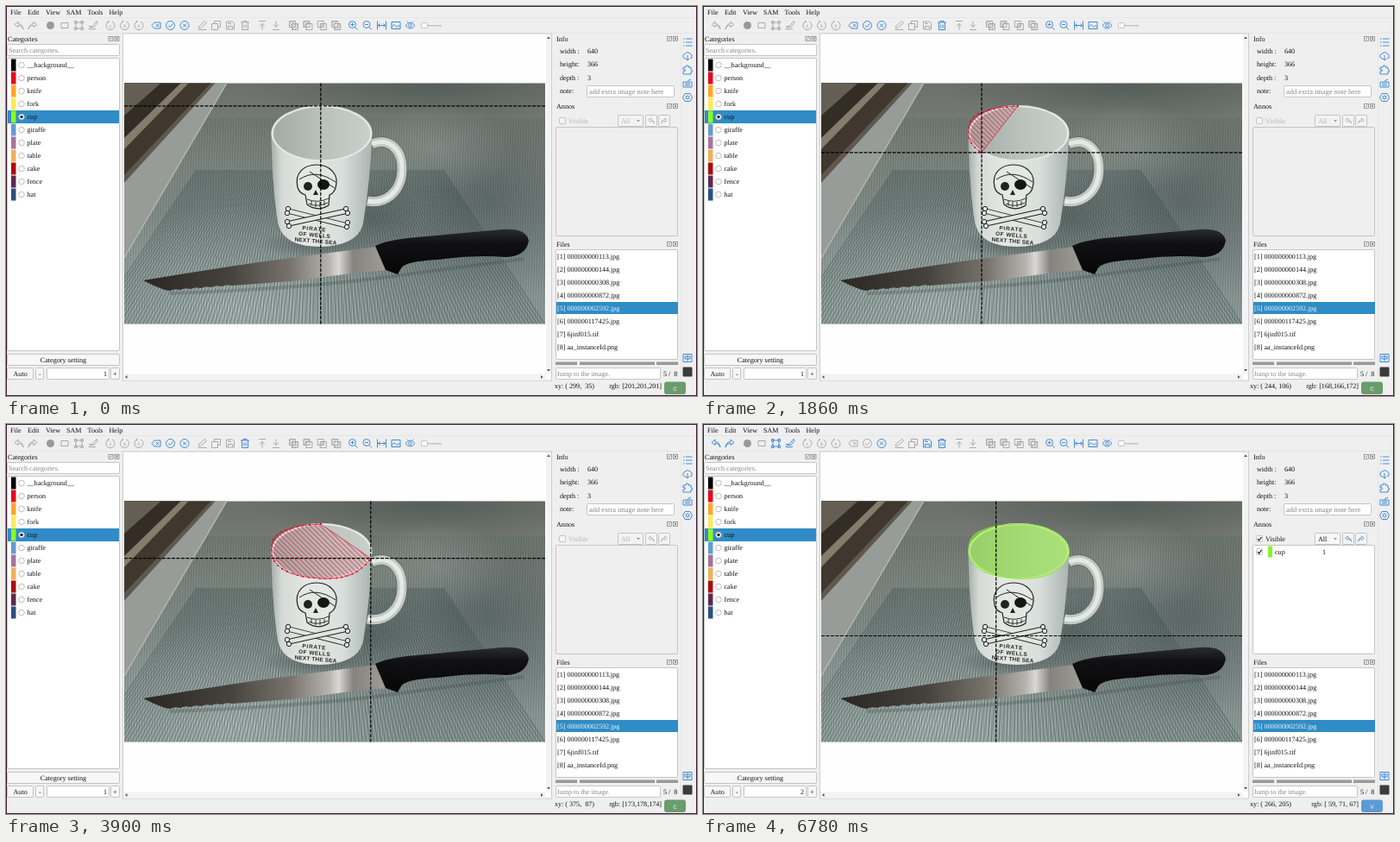
These frames come from a looping animation (801x452 px, 6.84 s). An HTML page:

```html
<!DOCTYPE html>
<html lang="en">
<head>
<meta charset="utf-8">
<title>Annotating a cup</title>
<style>
html, body { margin: 0; width: 100%; height: 100%; overflow: hidden; background: #efefef; }
svg { display: block; width: 100vw; height: 100vh; }
text { font: 8.1px "Liberation Serif", "Times New Roman", serif; white-space: pre; text-rendering: geometricPrecision; }
.sans { font: bold 6.4px "Liberation Sans", Arial, sans-serif; }
.icon { fill: none; stroke: #a2a2a2; stroke-width: .9; }
.icon.on { stroke: #2f7fd3; }
.icon text { font: 5px "Liberation Sans", Arial, sans-serif; stroke: none; fill: #999; text-anchor: middle; }
</style>
</head>
<body>
<svg id="stage" viewBox="0 0 801 452"></svg>
<script>
const LOOP = 6840, DONE = 6420, BLUE = '#308cc6', SCALE = 0.762;
const stage = document.getElementById('stage');

// Markup helpers
const text = (x, y, s, fill = '#111', more = '') => `<text x="${x}" y="${y}" fill="${fill}" ${more}>${s}</text>`;
const path = (d, fill, more = '') => `<path d="${d}" fill="${fill}" ${more}/>`;
const stroke = (d, color, width, more = '') => path(d, 'none', `stroke="${color}" stroke-width="${width}" ${more}`);
const rect = (x, y, w, h, fill, more = '') =>
  `<rect x="${x}" y="${y}" width="${w}" height="${h}" fill="${fill}" ${more}/>`;
const box = (x, y, w, h, fill = '#fff') =>
  rect(x + .5, y + .5, w - 1, h - 1, fill, 'stroke="#b9b9b9" stroke-width=".8" rx="1"');
const gradient = (id, stops, more = '') => `<linearGradient id="${id}" ${more}>` +
  stops.map(([at, c]) => `<stop offset="${at}" stop-color="${c}"/>`).join('') + '</linearGradient>';
const lines = (id, gap, angle, color, width) =>
  `<pattern id="${id}" width="${gap}" height="${gap}" patternUnits="userSpaceOnUse" patternTransform="rotate(${angle})">
  <path d="M${gap / 2} 0V${gap}" stroke="${color}" stroke-width="${width}"/></pattern>`;
// states: one digit per phase (idle, drawing, done), 1 = enabled
const icon = (x, y, states, d, more = '', scale = 1) =>
  `<g class="icon" data-states="${states}" transform="translate(${x} ${y}) scale(${scale})"><path d="${d}"/>${more}</g>`;

const defs = `<defs>
${gradient('mat', [[0, '#6c706a'], [.35, '#7f8681'], [1, '#8f9c9a']], 'x2="0" y2="1"')}
${gradient('body', [[0, '#a5aeaa'], [.1, '#d3d9d6'], [.35, '#e4e8e5'], [.7, '#d9dfdc'], [1, '#a9b3af']])}
${gradient('inside', [[0, '#a4aba7'], [.5, '#bac1bd'], [1, '#c9cfcb']])}
${gradient('blade', [[0, '#2a2723'], [.35, '#45423d'], [.6, '#77736c'], [.76, '#b5b3ae'], [.8, '#d8d8d4'], [.86, '#85837e'], [1, '#a09e98']])}
${gradient('grip', [[0, '#2a2c2f'], [.3, '#111113'], [1, '#060606']], 'x2="0" y2="1"')}
<radialGradient id="shade"><stop stop-color="#3f4b4b" stop-opacity=".5"/><stop offset="1" stop-color="#3f4b4b" stop-opacity="0"/></radialGradient>
<radialGradient id="glow"><stop stop-color="#c8d2cf" stop-opacity=".6"/><stop offset="1" stop-color="#c8d2cf" stop-opacity="0"/></radialGradient>
${lines('weave', 3, 2, '#28403f', 1)}${lines('hatch', 4, -45, '#d8142c', .8)}
<marker id="dot" markerWidth="2" markerHeight="2" refX="1" refY="1" markerUnits="userSpaceOnUse"><rect width="2" height="2" fill="#e01028"/></marker>
<clipPath id="frame"><rect x="137" y="89.5" width="488" height="279"/></clipPath></defs>`;

const bone = d => stroke(d, '#222', 6.4, 'stroke-linecap="round"') + stroke(d, '#e2e6e3', 4.4, 'stroke-linecap="round"');
const knob = (x, y) => `<circle cx="${x}" cy="${y}" r="2.7" fill="#e2e6e3" stroke="#222"/>`;
const handle = 'M424 160C443 152 460 165 459 191C458 215 440 230 419 226';
// Fine threads fanning out towards the viewer
const fan = Array.from({ length: 120 }, (_, i) => `M${365 + (i - 60) * 2.4} 190L${365 + (i - 60) * 4.4} 369`).join('');

const photo = `<g clip-path="url(#frame)">
${rect(137, 89, 488, 280, 'url(#mat)')}
<ellipse cx="270" cy="350" rx="200" ry="120" fill="url(#glow)"/>
<ellipse cx="560" cy="225" rx="140" ry="120" fill="url(#shade)"/>
<ellipse cx="490" cy="95" rx="210" ry="40" fill="url(#shade)"/>
<ellipse cx="500" cy="165" rx="90" ry="50" fill="url(#glow)" opacity=".4"/>
${rect(137, 130, 488, 239, 'url(#weave)', 'opacity=".25"')}
${stroke(fan, '#24383a', 1.5, 'opacity=".3"')}
${path('M137 89H256L137 292Z', '#979c98')}
${stroke('M256 89L137 292', '#b0b6b1', 1.5)}
${path('M137 89H243L137 205Z', '#5e594f')}
${path('M137 89H238L137 196Z', '#40382e')}
${path('M137 89H212L137 166Z', '#857c6c')}
${path('M137 89H203L137 153Z', '#332d26')}
${path('M137 89H180L137 127Z', '#645e53')}
<ellipse cx="425" cy="245" rx="60" ry="45" fill="url(#shade)"/>
<ellipse cx="360" cy="276" rx="66" ry="16" fill="url(#shade)"/>
${stroke(handle, '#59635f', 12.5) + stroke(handle, '#c0c9c5', 11) + stroke(handle, '#e4e9e6', 5)}
${path('M307.500 146C308 190 311 225 315 250Q320 279 364 279Q408 278 414 252Q422 205 424.500 146Z', 'url(#body)')}
<ellipse cx="366" cy="147.500" rx="58.500" ry="32.500" fill="#e4e8e5"/>
<ellipse cx="366" cy="147.700" rx="56" ry="30.500" fill="url(#inside)"/>
${bone('M329 238L393 254')}${bone('M329 252L393 238')}
${knob(327, 235) + knob(326, 240) + knob(395, 256) + knob(396, 251) + knob(326, 250) + knob(328, 255) + knob(394, 235) + knob(396, 240)}
${path('M338 210C334 193 346 184 360 184S387 194 382 211Q380 217 375 219L374 231Q361 239 349 230L347 219Q340 217 338 210Z', '#e4e8e5', 'stroke="#222" stroke-width="1.200"')}
${stroke('M340 201Q359 188 382 204M352 192L381 211', '#222', 1)}
<circle cx="350" cy="209" r="5" fill="#222"/><ellipse cx="368" cy="207" rx="7" ry="6" fill="#151515"/>
${path('M359 213L356 219L362 219Z', '#222')}
${stroke('M349 224Q361 229 374 223M351 229Q361 234 373 228M354 226V231M359 227V233M364 227V233M369 226V231', '#222', .9)}
<g fill="#252525" text-anchor="middle" transform="rotate(5 358 262)">
<text class="sans" x="357" y="260.500" letter-spacing=".8">PIRATE</text>
<text class="sans" x="358" y="267.500" letter-spacing=".5">OF WELLS</text>
<text class="sans" x="360" y="274.500" letter-spacing=".2">NEXT THE SEA</text></g>
${stroke('M190 333Q340 328 450 313L600 293', '#354341', 4, 'opacity=".25"')}
${path('M159 318Q230 306 300 296L429 279L442 306L400 310L330 319L262 324' + 'l-6-.800l-6 1.800'.repeat(6) + 'L184 329Q170 324 159 318Z', 'url(#blade)')}
${path('M428 278Q440 272 465 269L575 259Q603 257 606 272Q603 290 580 291Q540 288 500 294Q462 296 458 304L454 311L440 306Z', 'url(#grip)')}
</g>`;

const ring = 'M-5 0a5 5 0 1 0 10 0a5 5 0 1 0-10 0';
const cycle = 'M-2-4.500A5 5 0 1 0 2-4.500M-3-5.500L-1.500-4.500L-3-3';
const lens = 'M-5-1a4 4 0 1 0 8 0a4 4 0 1 0-8 0M2 2L5 5M-3-1H1';
const squares = 'M-5-5H2V2H-5ZM-2-2H5V5H-2Z';
const undo = 'M-1-4.500L-5-1L-1 2V0Q4 0 5 4.500Q4-2-1-2Z', redo = 'M1-4.500L5-1L1 2V0Q-4 0-5 4.500Q-4-2 1-2Z';
const letter = s => `<text y="2">${s}</text>`;
const toolbar = [
  [15, '001', undo], [31, '001', redo], [68, '000', 'M-4-3H4V3H-4Z'],
  [84.5, '001', 'M-3.500-3.500H3.500V3.500H-3.500Z' + [[-5, -5], [2.5, -5], [-5, 2.5], [2.5, 2.5]].map(p => `M${p}h2.500v2.500h-2.500z`).join('')],
  [101, '001', 'M-5 1H-1L4-5L5-3L1 2Q-5 2-5 4Q-4 5 3 4'],
  [121, '000', cycle, letter(1)], [137.5, '000', cycle, letter('S')], [154, '000', cycle, letter(0)],
  [174, '110', 'M-5 0L-2-3.500H5V3.500H-2ZM0-1.500L3 1.500M3-1.500L0 1.500'],
  [190.5, '110', ring + 'M-2.500 0L-.5 2L3-2'], [207, '111', ring + 'M-2-2L2 2M2-2L-2 2'],
  [227.5, '000', 'M-4 3V1L3-5L5-3L-2 3ZM-5 5H5'], [243.5, '000', 'M-5-2H2V5H-5ZM-2-2V-5H5V2H2'],
  [260, '001', 'M-4.500-4.500H2.500L4.500-2.500V4.500H-4.500ZM-2.500 4V1H2.500V4M-2-4V-2H1'],
  [277, '011', 'M-5-3.500H5M-2-3.500V-5H2V-3.500M-3.500-3.500V5H3.500V-3.500M-1.200-1V3M1.200-1V3'],
  [297, '000', 'M0 5V-2M-3 1L0-2L3 1M-4-5H4'], [313, '000', 'M0-5V2M-3-1L0 2L3-1M-4 5H4'],
  ...['M-5-2L-2-5M-5 1L1-5M-2 5L5-2M1 5L5 1M-2 1L2-2', 'M-5-2L-2-5M-5 1L1-5M-4 2L2-4', 'M-2 1L1-2M-1 2L2-1',
    'M-5-2L-2-5M-5 1L1-5M-2 5L5-2M1 5L5 1'].map((d, i) => [333.5 + 16.4 * i, '000', squares + d]),
  [402.5, '111', lens + 'M-1-3V1'], [419, '111', lens],
  [435.5, '111', 'M-5-5V5M5-5V5M-4 0H4M-2-2L-4 0L-2 2M2-2L4 0L2 2'],
  [452, '111', 'M-5-4H5V4H-5ZM-5 2L-2-1L1 2L3 0L5 2'],
  [468.5, '111', 'M-5.500 0Q0-7 5.500 0Q0 7-5.500 0ZM-1.800 0a1.800 1.800 0 1 0 3.600 0a1.800 1.800 0 1 0-3.600 0M-3-4L-4-5M3-4L4-5'],
].map(([x, ...rest]) => icon(x, 22.5, ...rest)).join('') +
  '<circle cx="51.500" cy="22.500" r="4.500" fill="#999"/>' +
  rect(482, 22, 23, 1.5, '#c4c4c4') + box(481, 19, 8, 7, '#f8f8f8');

const sidebar = [
  [42, 'M-5-4H-3.500M-5 0H-3.500M-5 4H-3.500M-2-4H5.500M-2 0H5.500M-2 4H5.500'],
  [58, 'M-2 3H-3Q-6 2-5-1Q-4-3-2.500-3Q0-6 3-3Q6-2 5 2L3 3M0-1V5M-2 3L0 5L2 3'],
  [74, 'M-5-3H-2Q-2-6 0-5Q2-5 1-3H4V0Q6 0 5.500 2Q5 3 4 2V5H-5V2Q-2 2-2.500 0Q-3-1-5 0Z'],
  [90, 'M-5-2H5V4H-5ZM-3 0H3M-3 2H3M0-2Q0-4 4-5'],
  [106, 'M-3-4.500H3L5.500 0L3 4.500H-3L-5.500 0ZM-2 0a2 2 0 1 0 4 0a2 2 0 1 0-4 0'],
  [408, 'M-5-4.500H5V4.500H-5ZM-3-2H3V1H-3ZM0-3.500V3.500'],
].map(([y, d]) => icon(790, y, '111', d)).join('') + rect(784.5, 418.5, 11, 11, '#3b3b3b', 'rx="1"');

const dockTitle = (x, y, s, right) => text(x, y, s) +
  [right - 7, right].map((c, i) => rect(c - 2.5, y - 5.2, 5, 5, '#f4f4f4', 'stroke="#777" stroke-width=".7"') +
    stroke(i ? `M${c - 1.3} ${y - 4}l2.600 2.600m0-2.600l-2.600 2.600` : `M${c - 1.2} ${y - 1.5}l2.400-2.400`, '#555', .8)).join('');

const categories = [['__background__', '#000'], ['person', '#e6061f'], ['knife', '#ffa62b'], ['fork', '#ffe95a'], ['cup', '#8aff1c'],
  ['giraffe', '#639cd2'], ['plate', '#a8729d'], ['table', '#efb057'], ['cake', '#ae0b0f'], ['fence', '#5d2a50'], ['hat', '#2b5080']];
const left = dockTitle(2, 40.5, 'Categories', 128.5) + box(1, 44, 131, 14) + text(3, 53.5, 'Search categories.', '#858585') +
  box(1, 60, 131, 340) + rect(2, 121, 129, 15, BLUE) +
  categories.map(([name, color], i) => {
    const y = 68.5 + 15 * i;
    return rect(6, y - 7, 5.5, 14, color) +
      `<circle cx="18" cy="${y}" r="3.300" fill="#fff" stroke="#aaa" stroke-width=".8"/>` +
      (i === 4 ? `<circle cx="18" cy="${y}" r="1.700" fill="#111"/>` : '') + text(24.5, y + 2.6, name);
  }).join('') +
  box(1, 403, 131, 14, '#f7f7f7') + text(66.5, 412.5, 'Category setting', '#111', 'text-anchor="middle"') +
  box(1, 419, 31, 14, '#f7f7f7') + text(8.5, 429, 'Auto') + box(34, 419, 10, 14, '#f7f7f7') + text(38, 428.5, '-') +
  box(47, 419, 73, 14) + text(117, 429, '1', '#111', 'id="count" text-anchor="end"') +
  box(121, 419, 11, 14, '#f7f7f7') + text(124, 429, '+');

const files = ['000000000113.jpg', '000000000144.jpg', '000000000308.jpg', '000000000872.jpg', '000000002592.jpg',
  '000000117425.jpg', '6jinf015.tif', 'aa_instanceId.png'];
const right = dockTitle(638, 40.5, 'Info', 776) +
  [['width :', 640], ['height:', 366], ['depth :', 3], ['note:', '']].map(([k, v], i) =>
    text(642, 54.5 + 15.6 * i, k) + text(674, 54.5 + 15.6 * i, v)).join('') +
  box(673, 92, 102, 14) + text(676, 101.5, 'add extra image note here', '#858585', 'style="font-size:8.400px"') +
  dockTitle(638, 118.5, 'Annos', 776) +
  `<g id="annosOff">${box(641, 129, 8, 8, '#f4f4f4') + text(652, 136, 'Visible', '#b5b5b5') + box(709, 126, 30, 14, '#f2f2f2') + text(713, 136, 'All', '#b5b5b5') + box(637, 140, 142, 127, '#efefef')}</g>` +
  `<g id="annosOn">${box(641, 129, 8, 8) + text(652, 136, 'Visible') + box(709, 126, 30, 14, '#f7f7f7') + text(713, 136, 'All') + box(637, 140, 142, 127) +
    box(641, 144, 8, 8) + rect(655, 141.5, 5, 13, '#8cf32a') + text(663, 151, 'cup') + text(718, 151, '1') +
    stroke('M643 133l1.500 2l3-4M643 148l1.500 2l3-4', '#111', 1.2)}</g>` +
  path('M731 132h4l-2 2.500z', '#999') + box(741, 126, 14, 14, '#f4f4f4') + box(756, 126, 14, 14, '#f4f4f4') +
  icon(748, 133, '001', undo, '', .7) + icon(763, 133, '001', redo, '', .7) +
  dockTitle(638, 278.5, 'Files', 776) + box(637, 282, 142, 128) + rect(638, 343, 141, 14, BLUE) +
  files.map((f, i) => text(639, 293 + 15 * i, `[${i + 1}] ${f}`, i === 4 ? '#f2f8fc' : '#111')).join('') +
  rect(637, 412.5, 25, 3.5, '#999') + rect(665, 412.5, 87, 3.5, '#999') + rect(754, 412.5, 25, 3.5, '#999') +
  box(637, 419, 122, 14) + text(638.5, 429, 'Jump to the image.', '#858585') + text(762, 429, '5 /  8');

const menu = [[5, 'File'], [25, 'Edit'], [46, 'View'], [70, 'SAM'], [94.5, 'Tools'], [119.5, 'Help']].map(([x, s]) => text(x, 9.5, s)).join('');
const view = rect(135.5, 32, 497, 402, '#fdfefd', 'stroke="#c4c4c4" stroke-width=".8"') +
  rect(626, 33, 6, 393, '#f3f3f3') + rect(136, 426.5, 490, 7, '#f3f3f3') +
  path('M627 38h4l-2-2.500zM627 421h4l-2 2.500zM140.500 428v4l-2.500-2zM620 428v4l2.500-2z', '#555');

stage.innerHTML = defs + rect(0, 0, 801, 452, '#efefef') + stroke('M0 13.500H801M0 31.500H801M782.500 32V434', '#e4e4e4', .8) +
  menu + toolbar + left + view + photo + right + sidebar +
  '<polygon id="shape"/>' +
  stroke('', '#000', 1.2, 'id="cross" stroke-dasharray="4 1.500"') +
  text(682, 443, '', '#111', 'id="xy" text-anchor="end"') + text(760, 443, '', '#111', 'id="rgb" text-anchor="end"') +
  rect(763, 435.5, 25, 14.5, '#6a9c6c', 'id="badge" rx="3"') + text(775.5, 445.5, 'C', '#d3e6d4', 'id="key" class="sans" text-anchor="middle"') +
  rect(.5, .5, 800, 451, 'none', 'stroke="#3a1a33"');

// Pointer along the rim: time, x, y in image pixels
const rim = [[0, 299, 35], [450, 266, 38], [725, 247, 44], [930, 234, 50], [1120, 226, 61], [1260, 225, 71], [1390, 224, 80],
  [1585, 230, 93], [1840, 243, 105], [2165, 264, 113], [2520, 289, 117], [2850, 312, 118], [3240, 339, 114], [3585, 360, 103],
  [3900, 375, 87], [4185, 377, 73], [4470, 371, 60], [4980, 351, 45], [5450, 332, 38], [6060, 306, 35], [DONE, 299, 35]];
const tones = [[0, 201, 201, 201], [1260, 158, 148, 157], [2520, 180, 185, 188], [3900, 173, 178, 174], [4980, 112, 111, 125],
  [6060, 196, 196, 204], [6780, 59, 71, 67], [LOOP, 59, 71, 67]];

function locate(keys, t) {
  let i = 0;
  while (i < keys.length - 2 && keys[i + 1][0] <= t) i++;
  return [i, (t - keys[i][0]) / (keys[i + 1][0] - keys[i][0])];
}
function pointer(t) {
  if (t > DONE) {
    const u = Math.min(1, (t - DONE) / (6780 - DONE));
    return [299 - 33 * u, 35 + 170 * u];
  }
  // Catmull-Rom spline
  const [i, u] = locate(rim, t), at = j => rim[Math.max(0, Math.min(rim.length - 1, j))];
  const [a, b, c, d] = [at(i - 1), at(i), at(i + 1), at(i + 2)];
  return [1, 2].map(k => b[k] + .5 * u * (c[k] - a[k] + u * (2 * a[k] - 5 * b[k] + 4 * c[k] - d[k] + u * (3 * (b[k] - c[k]) + d[k] - a[k]))));
}
const toStage = ([x, y]) => [137 + SCALE * x, 89.3 + SCALE * y];
const el = id => document.getElementById(id);
const pad = (v, n) => String(Math.round(v)).padStart(n);
let lastPhase = -1;

function setPhase(phase) {
  const done = phase === 2, shape = el('shape');
  document.querySelectorAll('.icon').forEach(n => n.classList.toggle('on', n.dataset.states[phase] === '1'));
  el('annosOn').style.display = done ? '' : 'none';
  el('annosOff').style.display = done ? 'none' : '';
  el('count').textContent = done ? 2 : 1;
  el('badge').setAttribute('fill', done ? '#5b9bd5' : '#6a9c6c');
  el('key').textContent = done ? 'V' : 'C';
  shape.setAttribute('fill', done ? 'rgba(140,243,42,.5)' : 'url(#hatch)');
  shape.setAttribute('stroke', done ? '#8ce62c' : '#d8142c');
  shape.setAttribute('stroke-width', done ? 1 : .7);
  shape.style.marker = done ? 'none' : 'url(#dot)';
}

function draw(now) {
  const t = now % LOOP, phase = t < 60 ? 0 : t < DONE ? 1 : 2;
  if (phase !== lastPhase) setPhase(lastPhase = phase);
  const p = pointer(t), [x, y] = toStage(p);
  el('cross').setAttribute('d', `M137 ${y}H625M${x} 89.500V368.500`);
  el('xy').textContent = `xy: (${pad(p[0], 4)},${pad(p[1], 4)})`;
  const [i, u] = locate(tones, t);
  el('rgb').textContent = `rgb: [${[1, 2, 3].map(k => pad(tones[i][k] + u * (tones[i + 1][k] - tones[i][k]), 3))}]`;
  const points = [], end = Math.min(t, DONE);
  if (phase) {
    for (let s = 0; s < end; s += 120) points.push(toStage(pointer(s)));
    points.push(toStage(pointer(end)));
  }
  el('shape').setAttribute('points', points.join(' '));
}

const start = performance.now();
function tick() {
  draw(performance.now() - start);
  requestAnimationFrame(tick);
}
tick();
</script>
</body>
</html>
```
